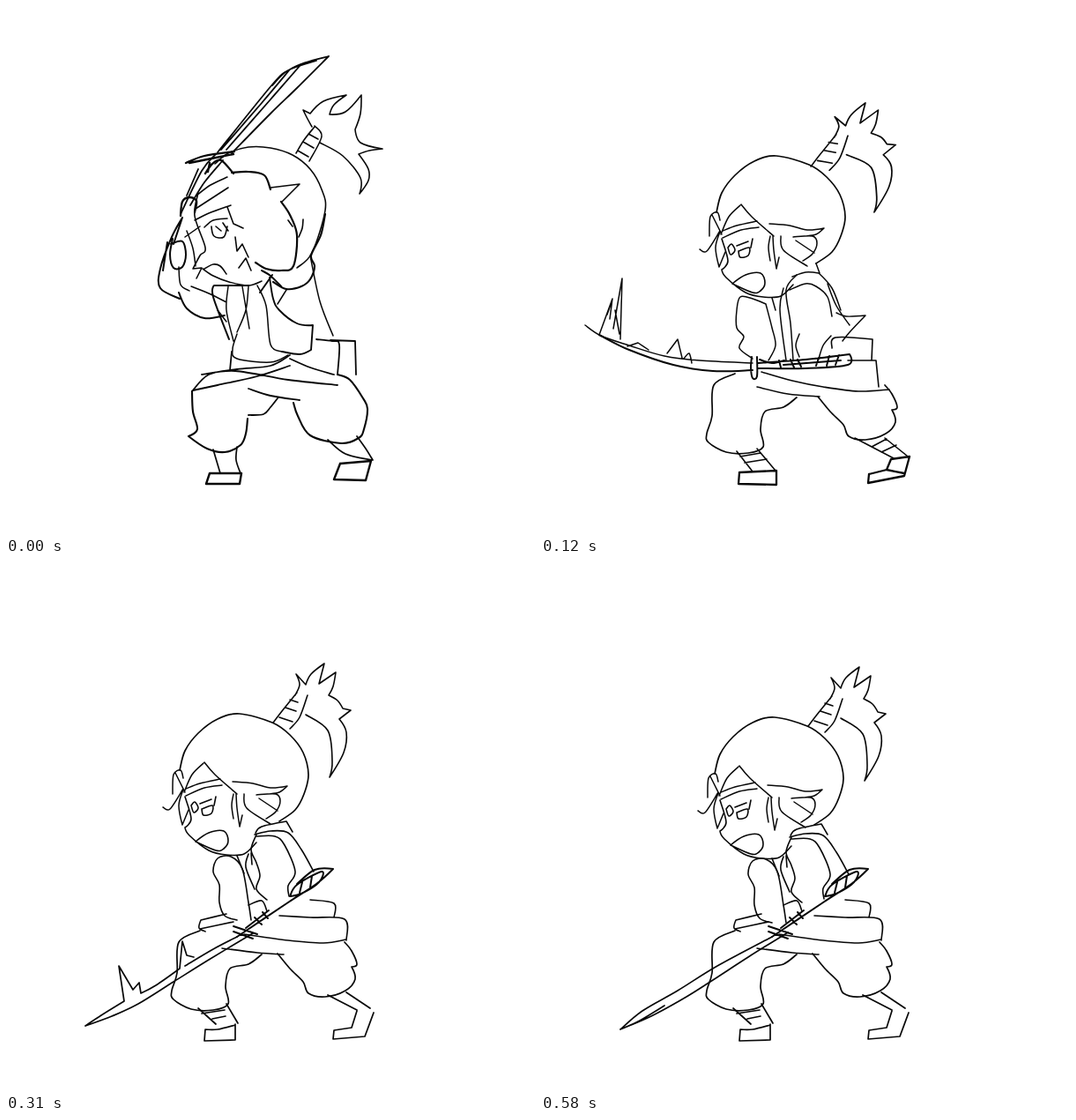
An HTML page that plays this animation: 600x600 px, repeating every 720 ms.

```html
<!DOCTYPE html>
<html lang="en">
<head>
<meta charset="utf-8">
<title>Sword swing</title>
<style>
html, body { margin: 0; width: 100%; height: 100%; overflow: hidden; background: #fff; }
svg { display: block; width: 100%; height: 100%; }
path { fill: none; stroke: #080808; stroke-linecap: round; stroke-linejoin: round; }
</style>
</head>
<body>
<svg id="stage" viewBox="0 0 600 600"></svg>
<script>
// "/" separates strokes; "!" marks a sharp corner; other points are joined smoothly.
function smooth(stroke) {
  const points = stroke.trim().split(/\s+/).map(text => {
    const [x, y] = text.replace('!', '').split(',').map(Number);
    return { x, y, sharp: text.endsWith('!') };
  });
  const tangent = i => {
    const a = points[Math.max(i - 1, 0)], b = points[Math.min(i + 1, points.length - 1)];
    return points[i].sharp ? [0, 0] : [(b.x - a.x) / 6, (b.y - a.y) / 6];
  };
  return points.map((p, i) => {
    if (!i) return `M${p.x} ${p.y}`;
    const q = points[i - 1], [ax, ay] = tangent(i - 1), [bx, by] = tangent(i);
    return `C${q.x + ax} ${q.y + ay} ${p.x - bx} ${p.y - by} ${p.x} ${p.y}`;
  }).join('');
}

const ink = (width, text) => `<path stroke-width="${width}" d="${text.split('/').map(smooth).join('')}"/>`;
const place = (transform, content) => `<g transform="${transform}">${content}</g>`;
const move = (x, y, content) => place(`translate(${x} ${y})`, content);

// Sword held overhead
const raisedSword = ink(1.8, `366,57 340,64 322,72 303,88 240,166 / 366,57 330,93 300,122 256,167
  / 322,72 290,110 244,163 / 334,67 300,106 250,163 / 352,62 320,73 302,90
  / 238,168 222,187 198,236 / 246,175 225,200 209,226 / 218,185 205,215`);
const raisedGrip = ink(2.3, `204,178 225,170 259,165 / 208,178 258,168 / 198,238 200,222 208,217 216,221 214,234
  / 226,190 234,179 244,175 258,190 / 231,178 229,188`);
const raisedHead = ink(1.6, `237,179 252,167 275,160 300,161 325,169 345,185 358,208 362,232 347,280 330,297
  / 300,206! 333,202! 313,222 / 320,243 325,250 / 332,262 336,252 337,242`);
const raisedHair = ink(1.6, `215,230 252,206 / 214,243 230,235 255,226 / 216,215 232,203 251,194
  / 218,212 214,238 226,274 220,283 212,298! 222,297! 216,309! / 251,228 258,247! 269,252
  / 260,262! 262,278! 268,270! 275,285 / 264,297! 272,286! 278,300`);
const raisedFace = ink(1.6, `223,298 235,306 253,313 275,317 290,312 / 225,298 235,293 243,295 250,304
  / 225,251 235,243 251,241 / 233,250! 236,261 247,262 251,250 / 238,250 244,255 / 246,246 252,255`);
const raisedLock = ink(2.2, `256,189 275,188 293,192 300,208 / 312,222 322,237 330,260 326,295
  312,300 295,298 283,291 / 362,236 357,260 346,283 350,295 345,310 335,318 318,321 303,313`);
const raisedTail = ink(1.6, `329,167 338,152 350,137 / 344,176 358,148 350,136 / 331,164 343,171 / 337,154 349,161 / 343,145 354,151
  / 347,137 342,128 337,118! 345,122! 360,108 386,101! 372,112 367,123! 385,120 403,101! 402,122 396,140! 402,155 427,162!
  412,164 400,168! 411,185 411,198 401,213! 402,195 382,170 356,155`);
const raisedSleeve = ink(2, `200,240 188,262 175,298 175,320 197,332 / 196,325 205,343 225,354 248,351
  / 187,270 200,267 204,282 200,296 190,297 186,282 189,264 / 183,268 178,300 / 200,240 190,270
  / 253,378 235,330 236,317! 275,317 / 288,325! 302,305 / 290,300 300,306 312,318`);
const raisedShirt = ink(1.5, `205,255 212,275 215,295 / 196,296 198,316 208,323 / 210,318 230,326 250,336 / 203,262 220,250
  / 252,318 250,345 258,380 / 275,318 272,345 262,370 / 268,318 276,366 / 285,317 295,340 300,384 313,392
  / 345,283 356,335 371,374 / 318,322 308,338 / 240,345 250,358 / 262,372 257,389 262,400 300,404 320,396`);
const raisedCuff = ink(1.9, `299,308 303,332 310,345 330,360 348,362! 346,390! 333,395 313,392`);
const raisedBelt = ink(1.8, `352,378 370,380 378,384 376,418 / 368,379 396,380! 397,418 / 322,400 345,410 372,418
  / 211,437 230,418 262,412 300,408 322,396 / 212,436 240,430 285,420 322,408 / 222,418 260,414 320,424 376,430 / 256,392 254,413
  / 275,434 300,442 333,447 / 308,445 300,455 292,463 275,464`);
const raisedTrousers = ink(2.1, `376,418 390,424 405,445 410,457 406,480 400,490 380,496 345,487 331,465 326,450
  / 274,468 272,485 266,498 248,506 228,502 207,488! 217,480 212,460 211,437`);
const raisedShins = ink(1.7, `235,503 243,530 / 262,500 261,515 266,530 / 365,492 385,508 415,515 / 398,488 408,502 416,515`);
const raisedShoes = ink(2.4, `231,530! 227,542! 265,542! 267,530! 231,530! / 379,519! 372,537! 408,538! 414,516! 379,519!`);

// Head and trousers shared by the lower stances
const skull = ink(1.7, `197,235 203,213 218,193 240,177 265,171 302,181 322,195 337,215 343,240 338,262 328,280 310,293`);
const ponytail = ink(1.6, `303,181 313,168 330,147 / 322,188 333,175 342,150 / 322,155 331,158 / 317,164 329,168 / 310,175 325,180
  / 328,150 333,138 329,126! 340,138! 346,126 361,114! 355,137! 374,124! 371,140 366,150! 376,156 382,165! 391,167!
  378,177! 386,192 383,215 367,243! 370,225 365,190 340,172`);
const fringe = ink(1.5, `189,262 190,240 198,235 201,244 / 178,277 186,279 201,256 / 192,238 203,260 / 224,227 211,240 202,260
  / 225,226 237,240 262,262 / 204,256 220,250 243,245 / 204,264 225,255 245,252 / 201,257 196,275 200,297! 207,280`);
const sideHair = ink(1.5, `257,248 280,250 300,255 319,253! 310,260 298,262 / 284,263 306,262 311,270 306,282 295,290
  / 287,267 308,281 / 270,262 273,278 300,296 / 258,262 256,275 258,290 / 261,262 262,278 265,299! 268,286`);
const face = ink(1.6, `203,265 210,290 203,300! 208,309 230,326 250,331 270,330 284,317
  / 215,316! 230,306 247,304 252,315 247,324 238,326 215,316 / 210,275 214,271 218,278 213,283 210,275
  / 220,273 233,268 / 222,279 224,286 233,284 234,275 222,279 / 238,265 236,275`);
const head = skull + fringe + sideHair + face;
const leftTrouser = ink(1.7, `220,417 196,430 194,465 188,485 190,495 210,506 235,507 252,500 249,480 254,460 275,455 290,444`);
const rightTrouser = ink(1.7, `308,443 322,460 337,475 343,488 362,492 385,485 396,472 392,458! 398,455 392,440 384,430`);

// Mid swing
const swingArms = ink(1.5, `255,338 240,332 226,330 222,345 222,365 230,375 225,388 240,400 / 255,338 262,365 266,385 258,402
  / 262,331 266,345 / 275,320 271,345 278,402 / 290,305 278,322 283,360 286,402
  / 282,322 300,315 312,318 325,330 330,352 / 329,374 320,385 315,400`);
const swingCoat = ink(1.5, `285,307 300,302 315,303! 330,320 340,345 / 312,292 316,303 / 325,315 335,340 350,362
  / 335,348 346,352 368,351! 350,370 342,380 / 293,372 289,385 293,398`);
const swingBlade = ink(1.5, `50,362 68,374 100,385 140,397 180,402 240,405 / 66,373! 81,332! 78,355! / 82,366! 92,309! 90,378!
  / 75,350 80,336 / 84,345 89,372 / 98,386! 110,382! 122,390 / 143,394! 155,378! 160,399 / 162,400 168,394 171,405`);
const swingGrip = ink(2, `66,373 100,390 150,407 195,414 240,413 / 239,398 238,410 240,422 245,420 245,398
  / 246,405 300,401 350,395! 348,407 300,411 246,411 / 270,402 272,410 / 283,401 287,410 / 291,401 295,409
  / 315,399 312,408 / 327,397 324,408 / 338,396 334,407 / 275,407 340,402 / 248,401 262,405 276,402`);
const swingBelt = ink(1.6, `330,388 334,376 376,378! 375,402 / 348,402 380,402! 383,432 / 250,415 285,425 320,432 360,437 395,435
  / 245,432 280,440 316,443`);
const swingShins = ink(1.6, `222,505 240,528 / 245,502 266,527 / 226,511 249,507 / 231,518 256,514
  / 356,490 400,513 / 390,490 415,510 / 375,500 392,491 / 386,506 403,498`);
const swingShoes = ink(2.3, `225,529! 224,542! 267,543! 267,527! 225,529! / 372,531! 392,526! 397,514! 418,511! 412,533! 371,541! 372,531!
  / 392,526! 412,530`);

// Sword lowered
const lowArms = ink(1.6, `284,308 278,325 284,340 288,355 284,370 296,382 / 284,310 305,310 316,320 328,350 320,366 321,378
  / 262,405 248,400 242,385 242,365 235,350 240,335 255,333 268,347 275,385 278,405`);
const lowCoat = ink(1.6, `283,306 290,299 318,293! 325,305 / 282,308 300,304 320,306 335,325 349,350
  / 262,332 270,352 / 275,330 272,345 282,370 / 278,329 279,342`);
const lowBelt = ink(1.6, `220,415 258,407 / 250,398 221,405! 219,414 226,418 / 275,388 290,383 296,395
  / 345,382 372,386 372,402 / 310,400 345,402 384,404 386,428 / 270,421 320,428 360,431 386,427 / 245,437 285,442 315,444`);
const lowFeet = ink(1.7, `218,505 238,523 / 250,500 263,522 / 222,511 248,507 / 234,517 249,514 / 365,490 398,507 / 386,487 413,505
  / 260,524 240,529 226,529! 225,542! 260,541! 260,523 / 398,508! 392,527! 372,530! 371,540! 407,537! 417,510`);
const lowGrip = ink(2, `330,364 350,348 371,347! 352,364 320,385 262,424 / 322,378 330,365 358,350 355,362 335,375 322,378
  / 336,362 333,374 / 347,355 345,368 / 258,412 285,421 / 258,418 280,426 / 272,414 298,394 / 282,402 290,410 / 291,396 297,403`);
const jaggedBlade = ink(1.7, `90,525 120,514 150,500 190,475 230,450 280,420
  / 90,525 108,513 134,497! 128,457! 144,484! 151,476! 153,488! 170,479 197,460! 200,429! 205,445! 213,447! / 203,457 235,438 262,424`);
const cleanBlade = ink(1.7, `90,529 125,514 165,492 195,473 235,447 280,419 / 90,529 115,508 155,485 200,457 262,424 / 90,529 112,519 140,502`);

const raised = raisedSword + raisedGrip + raisedHead + raisedHair + raisedFace + raisedLock + raisedTail + raisedSleeve
  + raisedShirt + raisedCuff + raisedBelt + raisedTrousers + raisedShins + raisedShoes;
const swinging = move(2, -1, head) + place('matrix(1.097 -.126 .0265 .967 -31.1 45.2)', ponytail)
  + swingArms + swingCoat + swingBlade + swingGrip + swingBelt + leftTrouser + move(6, 0, rightTrouser) + swingShins + swingShoes;
const lowered = (sink, blade) => move(0, sink, head + ponytail) + move(0, sink * .75, lowArms + lowCoat)
  + lowBelt + leftTrouser + rightTrouser + lowFeet + lowGrip + blade;

const poses = [raised, swinging, lowered(0, jaggedBlade), lowered(4, cleanBlade)];
const stage = document.getElementById('stage');
stage.innerHTML = poses.map(pose => `<g>${pose}</g>`).join('');

function draw() {
  const current = Math.min(3, Math.floor(performance.now() % 720 / 120));
  [...stage.children].forEach((group, i) => group.style.display = i === current ? '' : 'none');
  requestAnimationFrame(draw);
}
draw();
</script>
</body>
</html>
```
